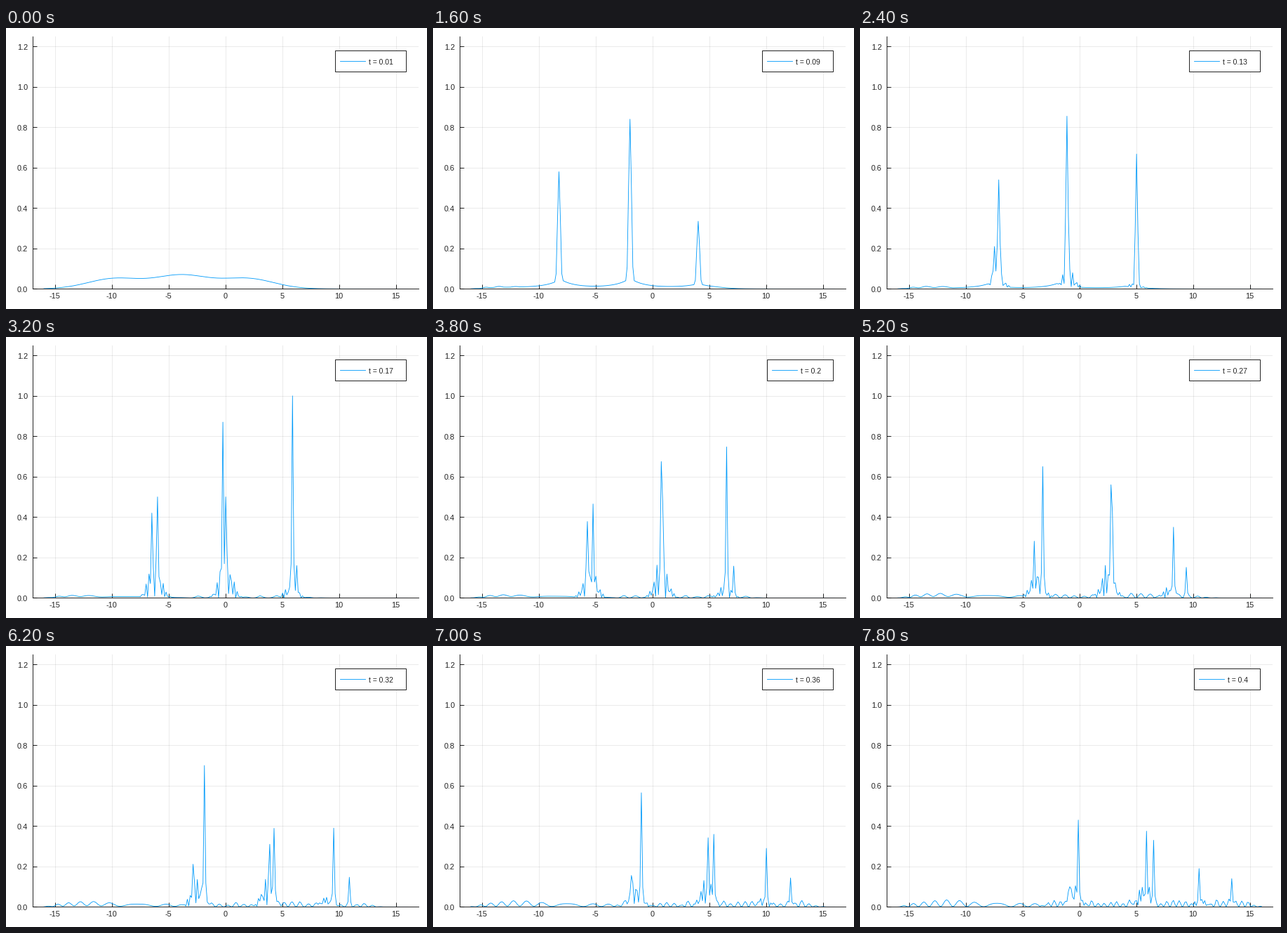
Write a matplotlib script that moves like this. It is 600 px wide and 400 px high and loops after 8000 ms.

```python
import matplotlib.pyplot as plt
import numpy as np
from matplotlib.animation import FuncAnimation
from matplotlib.lines import Line2D
from matplotlib.patches import Rectangle

W, H, DPI = 600, 400, 100
FRAMES, INTERVAL = 40, 200
FOCUS, SPLIT, LAST = 8, 16, 39      # frames where the humps focus, break up, end
PX = 72 / DPI
THIN = 0.85 * PX
BLUE, INK = "#009afa", "#222222"

n = np.arange(-128, 129)            # grid index, eight steps per unit
x = n / 8
rough = np.interp(n, n[::4], np.random.default_rng(7).uniform(0.2, 1, 65))

# Main spike of each packet: grid position and height at the key frames
KEYS = [8, 16, 22, 26, 31, 39]
MAIN = [
    ([-66, -48, -37, -26, -15, -1], [0.58, 0.50, 0.43, 0.65, 0.70, 0.43]),
    ([-16, -2, 15, 22, 31, 47], [0.84, 0.87, 0.48, 0.56, 0.31, 0.375]),
    ([32, 47, 58, 66, 76, 84], [0.335, 1.0, 0.495, 0.35, 0.39, 0.19]),
]
# Side spikes: position at the split, steps per frame, first and last height
SIDE = [(-52, 1.95, 0.42, 0.10), (0, 2.26, 0.50, 0.33), (50, 2.48, 0.16, 0.14)]
# Comb around each packet: centre when focused, steps per frame, height
COMB = [(-66, 2, 0.20), (-16, 2, 0.22), (32, 1.7, 0.07)]
# Humps at the start: height, first and last centre
HUMPS = [(0.051, -9.8, -8.2), (0.067, -3.9, -2), (0.051, 1.9, 4.05)]


def lerp(a, b, u):
    return a + (b - a) * u


def step(z):
    return 1 / (1 + np.exp(-z))


def bump(centre, width):
    return np.exp(-((n - centre) / width) ** 2)


def halo():
    """Skirts of the humps at the moment of focus."""
    y = 0.008 * step((50 - n) / 5) * step((n + 118) / 3)
    for c, a in ((-65, 0.04), (-16, 0.045), (32, 0.018)):
        y += a * np.exp(-abs(n - c) / 9)
    return y


def focusing(s):
    """Three broad humps that move right and contract."""
    width = lerp(3.3, 0.3, s)
    y = s * halo()
    for a, c0, c1 in HUMPS:
        y += a * lerp(1, 0.8, s) * 3.3 / width * bump(8 * lerp(c0, c1, s), 8 * width)
    return y


def packets(k, u, split):
    width = lerp(1.4, 0.75, split)
    parts = [np.interp(k, KEYS, h) * bump(round(np.interp(k, KEYS, p)), width)
             for p, h in MAIN]
    parts += [split * lerp(h0, h1, u) * bump(round(p + v * (k - SPLIT)), width)
              for p, v, h0, h1 in SIDE]
    for c, v, a in COMB:
        off = n - round(c + v * (k - FOCUS))
        teeth = np.cos(1.3 * off + 0.7 * k) ** 2
        parts.append(split * a * lerp(1, 0.6, u) * np.exp(-(off / 6) ** 2) * teeth)
    return np.max(parts, axis=0)


def tail(u):
    """Slow chirped ripples left behind on the left side."""
    d = lerp(-69, -58, u) - n
    wave = np.cos(np.pi * (abs(d) / lerp(27, 16, u)) ** lerp(1.85, 1.37, u)) ** 2
    floor = lerp(0.5, 0.05, u)
    env = lerp(0.013, 0.035, u) * (0.5 + 0.5 * np.exp(-((d - 35) / 18) ** 2))
    env *= step((d + 35) / 3) * step((n + 122) / 3)
    return env * lerp(floor, 1, wave)


def fringe(k, u):
    """Fine ripples between the packets and ahead of them."""
    wave = np.sin(np.pi * (n - 0.5 * k) / lerp(11, 4.4, u ** 0.5)) ** 2
    env = lerp(0.012, 0.045, u) * rough
    return env * wave * step((n + 24) / 3) * step((lerp(60, 122, u) - n) / 3)


def curve(k):
    if k < FOCUS:
        return focusing(k / FOCUS)
    split = min(1, (k - FOCUS) / (SPLIT - FOCUS))
    u = max(0, (k - SPLIT) / (LAST - SPLIT))
    return np.max([packets(k, u, split), tail(u), split * fringe(k, u),
                   (1 - split) * halo()], axis=0)


fig = plt.figure(figsize=(W / DPI, H / DPI), dpi=DPI, facecolor="white")
ax = fig.add_axes([38.4 / W, 1 - 371.4 / H, 549.5 / W, 359.5 / H])
ax.set(xlim=(-16.96, 16.96), ylim=(0, 1.25),
       xticks=range(-15, 16, 5), yticks=np.arange(7) / 5)
ax.grid(color="black", alpha=0.08, lw=PX)
ax.set_axisbelow(True)
ax.tick_params(direction="in", length=6 * PX, width=THIN,
               labelbottom=False, labelleft=False)
ax.spines[["top", "right"]].set_visible(False)
ax.spines[["left", "bottom"]].set_linewidth(THIN)


def label(px, py, s, size, ha):
    return fig.text(px / W, 1 - py / H, s, fontsize=size * PX, ha=ha,
                    va="baseline", color=INK, family="Liberation Sans")


for v in range(-15, 16, 5):
    label(312.2 + 16.2 * v, 385, str(v), 11, "center")
for i in range(7):
    label(31.2, 375.6 - 57.5 * i, f"{i / 5:.1f}", 11, "right")

line, = ax.plot(x, 0 * x, color=BLUE, lw=THIN)

# Legend, laid out in pixels
box = Rectangle((0, 0), 1, 1, fc="white", ec="black", lw=THIN,
                transform=None, zorder=4)
key = Line2D([0, 1], [0, 0], color=BLUE, lw=THIN, transform=None, zorder=5)
fig.add_artist(box)
fig.add_artist(key)
note = label(517, 51.8, "", 10.4, "left")
note.set_zorder(6)


def draw(k):
    line.set_ydata(curve(k))
    text = str((k + 1) / 100)
    left = 469.3 if len(text) == 4 else 476.3
    box.set_bounds(left, H - 62.3, 570.3 - left, 30)
    key.set_data([left + 6.5, left + 42.5], [H - 47.3] * 2)
    note.set_x((left + 47.5) / W)
    note.set_text("t = " + text)
    return line, box, key, note


anim = FuncAnimation(fig, draw, frames=FRAMES, interval=INTERVAL,
                     init_func=lambda: draw(0), repeat=True, repeat_delay=0)
plt.show()
```
